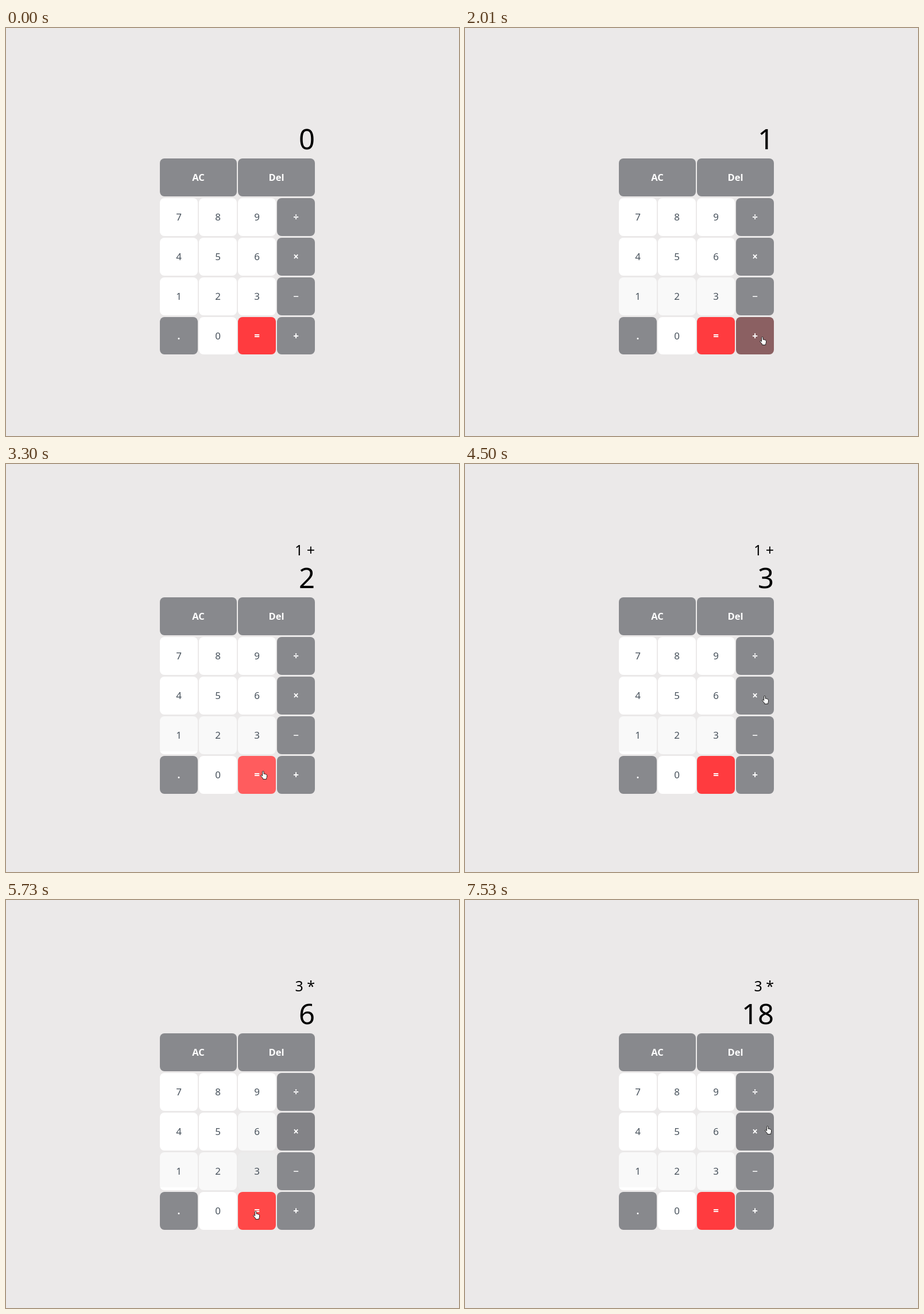
Recreate the animation shown at these times as an HTML page. Size 789 px wide and 710 px high, loop 7560 ms.

```html
<!DOCTYPE html>
<html lang="en">
<head>
<meta charset="utf-8">
<title>Calculator</title>
<style>
  :root {
    --loop: 7560ms;
    --grey: #88898d;
    --flash: #8b6062;
    --red: #ff3b3f;
    --glow: #ff5c5e;
    --seen: #f9f9f9;
    --over: #ececec;
  }
  html, body { margin: 0; width: 100%; height: 100%; overflow: hidden; }
  body { position: relative; background: #ebe9e9; font-family: "Noto Sans", "Open Sans", sans-serif; }

  .calc { position: absolute; left: 268px; top: 0; width: 270px; animation: shift var(--loop) step-end infinite; }
  .line { position: absolute; right: 0; width: 200px; overflow: hidden; text-align: right; color: #000; white-space: pre; }
  .prev { top: 129px; height: 30px; font-size: 25px; line-height: 30px; }
  .now { top: 162px; height: 60px; font-size: 49px; line-height: 60px; }
  .prev div { animation: prev var(--loop) step-end infinite; }
  .now div { animation: now var(--loop) step-end infinite; }
  .line span { display: block; height: 1.2em; }
  .prev span { height: 30px; }
  .now span { height: 60px; }

  .keys {
    position: absolute; left: 0; top: 227.3px;
    display: grid; grid-template: repeat(5, 65.7px) / repeat(4, 66px); gap: 3.2px 2px;
  }
  .keys b {
    position: relative; overflow: hidden; border-radius: 8px;
    display: flex; align-items: center; justify-content: center;
    background: #fff; color: #48525c; font-size: 17px; font-weight: 500; line-height: 24px;
  }
  .keys .op { background: var(--grey); color: #fff; font-weight: 600; }
  .keys .wide { grid-column: span 2; font-size: 16.5px; }
  .keys .eq { background: var(--red); }
  .one   { animation: one var(--loop) linear infinite; }
  .two   { animation: two var(--loop) linear infinite; }
  .three { animation: three var(--loop) linear infinite; }
  .six   { animation: six var(--loop) linear infinite; }
  .plus  { animation: plus var(--loop) linear infinite; }
  .times { animation: times var(--loop) linear infinite; }
  .eq    { animation: eq var(--loop) linear infinite; }
  .one::after {
    content: ""; position: absolute; left: 0; right: 0; bottom: 0; height: 5px; background: #fff;
    animation: strip var(--loop) step-end infinite;
  }

  .cursor { position: absolute; left: 0; top: 0; animation: path var(--loop) linear infinite; }
  .cursor svg { position: absolute; top: 0; left: 0; overflow: visible; }
  .cursor path { fill: #fff; stroke: #111; stroke-width: .9; stroke-linejoin: round; }
  .arrow { animation: arrow var(--loop) step-end infinite; }
  .cursor .hand { left: -4px; animation: hand var(--loop) step-end infinite; }

  @keyframes shift { 0% { top: 0; } 27.38%, 100% { top: 5.2px; } }
  @keyframes strip { 0% { opacity: 0; } 27.38%, 100% { opacity: 1; } }
  @keyframes prev {
    0% { transform: none; }
    27.38% { transform: translateY(-30px); }
    61.5%, 100% { transform: translateY(-60px); }
  }
  @keyframes now {
    0% { transform: none; }
    19.44% { transform: translateY(-60px); }
    36.11% { transform: translateY(-120px); }
    44.04% { transform: translateY(-180px); }
    68.25% { transform: translateY(-240px); }
    79.76%, 100% { transform: translateY(-300px); }
  }

  @keyframes one {
    0%, 16.1% { background: #fff; }
    17.5% { background: var(--seen); }
    19% { background: var(--over); }
    20.6%, 100% { background: var(--seen); }
  }
  @keyframes two {
    0%, 20.6% { background: #fff; }
    21.4% { background: var(--over); }
    23%, 33.3% { background: var(--seen); }
    34.5%, 37.7% { background: var(--over); }
    40.5%, 100% { background: var(--seen); }
  }
  @keyframes three {
    0%, 21.7% { background: #fff; }
    22.4% { background: var(--over); }
    23.8%, 69.8% { background: var(--seen); }
    71.4%, 78.97% { background: var(--over); }
    81.35%, 100% { background: var(--seen); }
  }
  @keyframes six {
    0%, 65.1% { background: #fff; }
    66.7%, 69.05% { background: var(--over); }
    71.4%, 100% { background: #f8f8f8; }
  }
  @keyframes plus {
    0%, 25% { background: var(--grey); }
    26.5%, 27.4% { background: var(--flash); }
    29.8%, 100% { background: var(--grey); }
  }
  @keyframes times {
    0%, 61.11% { background: var(--grey); }
    61.9% { background: var(--flash); }
    64.3%, 100% { background: #838387; }
  }
  @keyframes eq {
    0%, 42.06% { background: var(--red); }
    43.6%, 44.44% { background: var(--glow); }
    47.6%, 73% { background: var(--red); }
    74.6%, 78.97% { background: #ff4848; }
    79.76% { background: var(--glow); }
    82.5%, 100% { background: var(--red); }
  }

  @keyframes arrow {
    0% { opacity: 0; } 3.57% { opacity: 1; }
    16.14% { opacity: 0; } 47.22% { opacity: 1; }
    58.46% { opacity: 0; } 82.14% { opacity: 1; }
    99.2%, 100% { opacity: 0; }
  }
  @keyframes hand {
    0% { opacity: 0; } 16.14% { opacity: 1; }
    47.22% { opacity: 0; } 58.46% { opacity: 1; }
    82.14% { opacity: 0; } 99.2%, 100% { opacity: 1; }
  }
  @keyframes path {
    0%, 3.57% { transform: translate(778px, 11px); }
    5.95% { transform: translate(520px, 95px); }
    7.94% { transform: translate(240px, 225px); }
    9.92% { transform: translate(105px, 420px); }
    11.51% { transform: translate(98px, 491px); }
    13.1%, 13.89% { transform: translate(191px, 473px); }
    16.27% { transform: translate(275px, 477px); }
    17.86%, 19.84% { transform: translate(305px, 476px); }
    23.81% { transform: translate(531px, 500px); }
    25.79%, 28.17% { transform: translate(517px, 537px); }
    30.95% { transform: translate(455px, 518px); }
    33.73% { transform: translate(385px, 480px); }
    34.52%, 37.7% { transform: translate(378px, 478px); }
    41.27% { transform: translate(436px, 524px); }
    43.25%, 44.84% { transform: translate(447px, 534px); }
    47.22% { transform: translate(550px, 465px); }
    49.6%, 51.19% { transform: translate(637px, 405px); }
    51.59%, 53.97% { transform: translate(636px, 405px); }
    56.75% { transform: translate(575px, 424px); }
    59.13%, 61.9% { transform: translate(521px, 403px); }
    64.29% { transform: translate(500px, 414px); }
    66.67%, 69.05% { transform: translate(440px, 412px); }
    71.43% { transform: translate(437px, 470px); }
    74.6% { transform: translate(434px, 534px); }
    75.79%, 80.16% { transform: translate(434px, 541px); }
    84.52%, 87.3% { transform: translate(651px, 466px); }
    97.62% { transform: translate(578px, 427px); }
    99.6%, 100% { transform: translate(526px, 393px); }
  }
</style>
</head>
<body>
  <div class="calc">
    <div class="line prev"><div><span> </span><span>1 +</span><span>3 *</span></div></div>
    <div class="line now"><div><span>0</span><span>1</span><span>2</span><span>3</span><span>6</span><span>18</span></div></div>
    <div class="keys">
      <b class="op wide">AC</b><b class="op wide">Del</b>
      <b>7</b><b>8</b><b>9</b><b class="op">÷</b>
      <b>4</b><b>5</b><b class="six">6</b><b class="op times">×</b>
      <b class="one">1</b><b class="two">2</b><b class="three">3</b><b class="op">−</b>
      <b class="op">.</b><b>0</b><b class="op eq">=</b><b class="op plus">+</b>
    </div>
  </div>
  <div class="cursor">
    <svg class="arrow" width="9" height="15"><path d="M.5 .5V12L3.2 9.6 5.1 14.2 6.9 13.4 5 9H8.5Z"/></svg>
    <svg class="hand" width="12" height="15"><path d="M3.6 8.8V1.8q0-1.3 1.2-1.3T6 1.8V5.2q1.2-.6 1.9.3 1.2-.4 1.7.6 1.9-.2 1.9 1.5V10q0 1.5-.9 2.6v1.9h-6V13L1 9Q.2 7.6 1.5 7.3 2.6 7.1 3.6 8.8Z"/></svg>
  </div>
</body>
</html>
```
